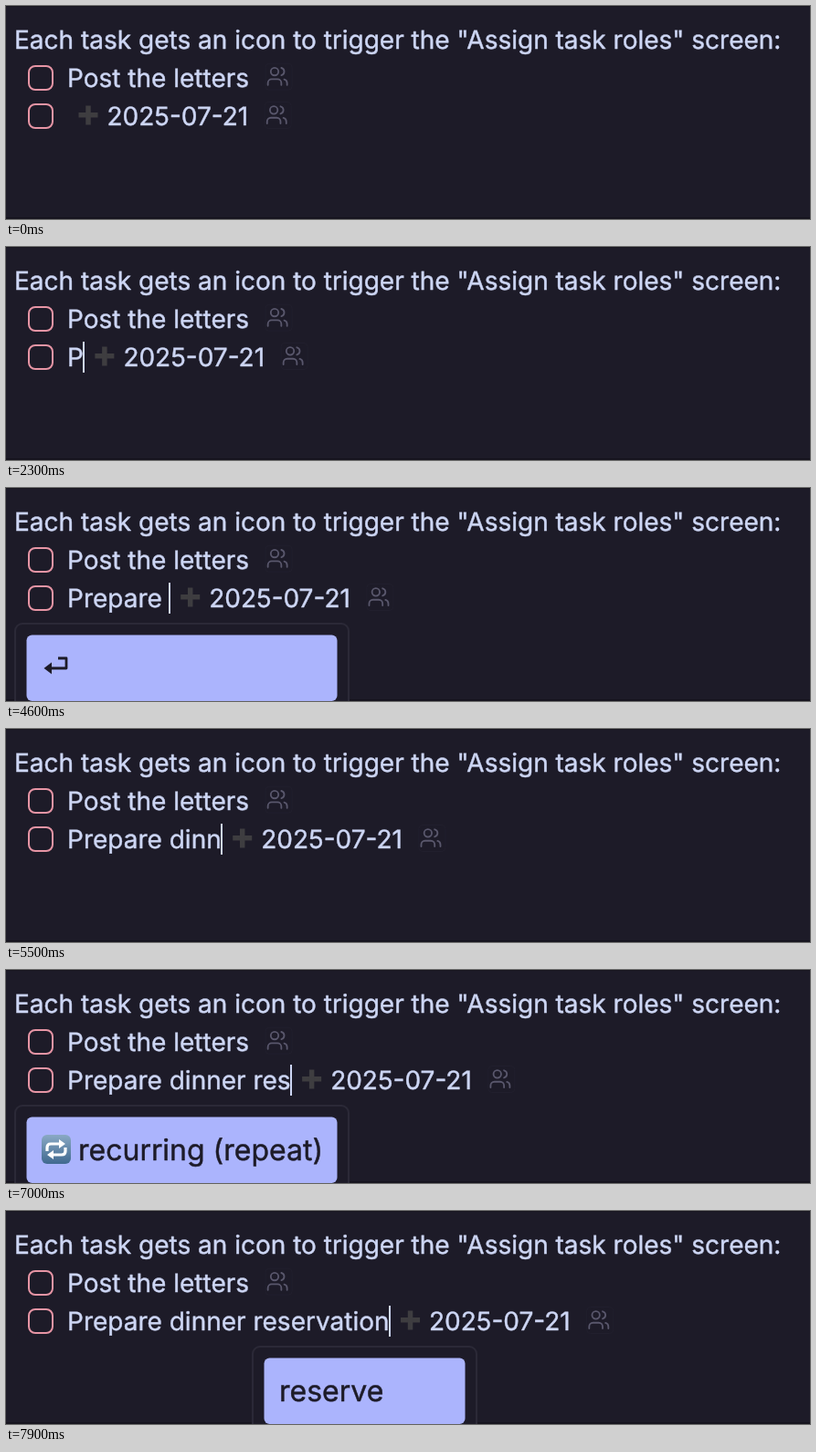
These frames come from a looping animation (880 by 234 pixels, 8000 ms). An HTML page with a canvas:

```html
<!DOCTYPE html>
<html lang="en">
<head>
<meta charset="utf-8">
<title>Task list typing</title>
<style>
  html, body { margin: 0; width: 100%; height: 100%; overflow: hidden; background: #1d1b28; }
  canvas { display: block; }
</style>
</head>
<body>
<canvas id="stage" width="880" height="234"></canvas>
<script>
const ctx = document.getElementById('stage').getContext('2d');
const LOOP = 8000, TICK = 100, BLINK = 600;
const BG = '#1d1b28', EDGE = '#16141e', INK = '#cdd6f4', BOX = '#e795a5';
const MUTED = '#59576c', PLUS = '#3e3d40', LINE = '#2b2937', ACCENT = '#abb4fd';
const FONT = 'Inter, sans-serif';
const LEFT = 67;

// Each burst types its text from a start time at a fixed pace.
const bursts = [
  { text: 'P', at: 2000, pace: 100 },
  { text: 'repare', at: 2500, pace: 85 },
  { text: ' ', at: 3400, pace: 100 },
  { text: 'dinner ', at: 5100, pace: 110 },
  { text: 'res', at: 6800, pace: 100 },
  { text: 'ervation', at: 7085, pace: 85 }
];

const popups = [
  { from: 2700, to: 3400, x: 68, w: 195, label: 'prepare' },
  { from: 3500, to: 5100, x: 10, w: 365, icon: drawReturn },
  { from: 5800, to: 6800, x: 10, w: 365, icon: drawReturn, fade: 220 },
  { from: 6800, to: 7150, x: 10, w: 365, icon: drawRepeat, label: 'recurring (repeat)', indent: 40 },
  { from: 7150, to: LOOP, x: 270, w: 245, label: 'reserve' }
];

function typedAt(t) {
  let text = '', last = -200;
  for (const b of bursts) {
    const n = Math.min(b.text.length, Math.floor((t - b.at) / b.pace) + 1);
    if (n <= 0) break;
    text += b.text.slice(0, n);
    last = b.at + (n - 1) * b.pace;
  }
  return { text, last };
}

function caretOn(t, last) {
  if (last < 0) return (t >= 400 && t < 1000) || t >= 1500;
  return Math.floor((t - last) / BLINK) % 2 === 0;
}

// A hairline outline gives the text its slightly heavy look.
function label(text, x, y, size = 28, color = INK) {
  ctx.font = `${size}px ${FONT}`;
  ctx.textRendering = 'geometricPrecision';
  ctx.fillStyle = ctx.strokeStyle = color;
  ctx.lineWidth = 0.45;
  ctx.lineJoin = 'round';
  ctx.fillText(text, x, y);
  ctx.strokeText(text, x, y);
  return x + ctx.measureText(text).width;
}

function roundBox(x, y, w, h, r) {
  ctx.beginPath();
  ctx.roundRect(x, y, w, h, r);
}

function strokePath(d, color, width) {
  ctx.strokeStyle = color;
  ctx.lineWidth = width;
  ctx.stroke(new Path2D(d));
}

function drawCheckbox(y) {
  roundBox(25, y, 26, 26, 7);
  ctx.strokeStyle = BOX;
  ctx.lineWidth = 2;
  ctx.stroke();
}

function drawPeople(x, y) {
  roundBox(x - 0.5, y - 1.5, 29, 29, 4);
  ctx.strokeStyle = '#211f2d';
  ctx.lineWidth = 1;
  ctx.stroke();
  ctx.save();
  ctx.translate(x, y);
  ctx.scale(1.05, 1.05);
  ctx.lineCap = ctx.lineJoin = 'round';
  strokePath('M16 21v-2a4 4 0 0 0-4-4H6a4 4 0 0 0-4 4v2M13 7a4 4 0 1 1-8 0a4 4 0 1 1 8 0' +
    'M22 21v-2a4 4 0 0 0-3-3.87M16 3.13a4 4 0 0 1 0 7.75', MUTED, 1.75);
  ctx.restore();
}

function drawPlus(x, y) {
  ctx.fillStyle = PLUS;
  ctx.fillRect(x, y + 7.5, 21, 5.5);
  ctx.fillRect(x + 7.75, y, 5.5, 21);
}

function drawReturn() {
  strokePath('M57 187H66V198H48', BG, 2.8);
  ctx.fillStyle = BG;
  ctx.fill(new Path2D('M41.5 198L50 191.5V204.5Z'));
}

function drawRepeat() {
  const g = ctx.createLinearGradient(0, 181, 0, 213);
  g.addColorStop(0, '#8aa9c4');
  g.addColorStop(1, '#40698f');
  ctx.fillStyle = g;
  roundBox(39, 181, 32, 32, 6);
  ctx.fill();
  strokePath('M45 199V195Q45 191 49 191H59M65 195V199Q65 203 61 203H51', '#fff', 3.2);
  ctx.fillStyle = '#fff';
  ctx.fill(new Path2D('M58 186L65 191L58 196ZM52 198L45 203L52 208Z'));
}

function drawPopup(p, t) {
  ctx.save();
  if (p.fade) ctx.globalAlpha = Math.min(1, (t - p.from) / p.fade);
  roundBox(p.x, 149, p.w, 110, 8);
  ctx.fillStyle = BG;
  ctx.fill();
  ctx.strokeStyle = LINE;
  ctx.lineWidth = 2;
  ctx.stroke();
  roundBox(p.x + 12.5, 161.5, p.w - 25, 72.5, 6);
  ctx.fillStyle = ACCENT;
  ctx.fill();
  if (p.icon) p.icon();
  if (p.label) label(p.label, p.x + 29 + (p.indent || 0), 209, 32, BG);
  ctx.restore();
}

function draw(t) {
  ctx.fillStyle = BG;
  ctx.fillRect(0, 0, 880, 234);
  ctx.fillStyle = EDGE;
  ctx.fillRect(0, 0, 880, 1);
  ctx.fillRect(0, 232, 880, 2);

  label('Each task gets an icon to trigger the "Assign task roles" screen:', 9, 47);
  drawCheckbox(66);
  drawPeople(label('Post the letters', LEFT, 89) + 18.5, 64.7);

  drawCheckbox(108);
  const { text, last } = typedAt(t);
  const end = label(text, LEFT, 131);
  drawPlus(end + 12.5, 109.5);
  drawPeople(label('2025-07-21', end + 43.5, 131) + 18.5, 107);
  if (caretOn(t, last)) {
    ctx.fillStyle = INK;
    ctx.fillRect(Math.round(end - 1), 104, 2, 34);
  }

  for (const p of popups) if (t >= p.from && t < p.to) drawPopup(p, t);
}

const start = performance.now();
function frame() {
  const t = (performance.now() - start) % LOOP;
  draw(Math.floor(t / TICK) * TICK);
  requestAnimationFrame(frame);
}
frame();
</script>
</body>
</html>
```
